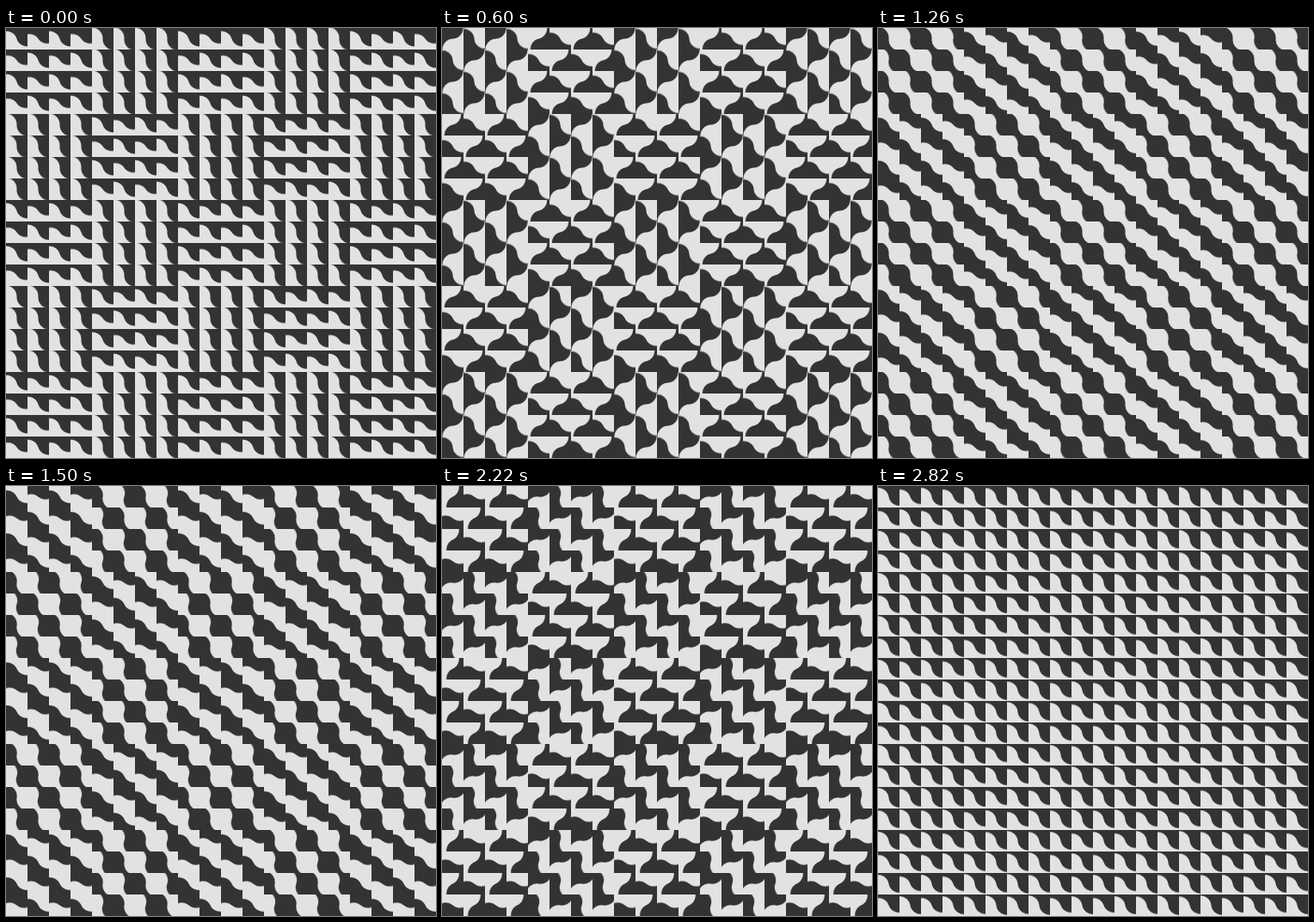
An HTML page with a canvas for the animation above (2.88 s loop, 500 px wide and 500 px high).

```html
<!DOCTYPE html>
<html lang="en">
<head>
<meta charset="utf-8">
<title>Turning tiles</title>
<style>
  html, body { margin: 0; width: 100%; height: 100%; overflow: hidden; background: #e2e2e2; }
  canvas { display: block; width: 500px; height: 500px; }
</style>
</head>
<body>
<canvas id="stage" width="500" height="500"></canvas>
<script>
const STAGE = 500, CELL = 25, GRID = STAGE / CELL, BLOCK = 4;
const STEP_MS = 60, STEPS = 48, LEAD = 2;
const SAMPLES = 15, SHUTTER = 0.6;
const LIGHT = '#e2e2e2', DARK = '#333333';

const ctx = document.getElementById('stage').getContext('2d');

// Dark half of a tile: two quarter arcs from corner to corner, extended past the cell.
const R = CELL / 2, FAR = CELL * 2;
const darkHalf = new Path2D(
  `M${-FAR} ${-FAR}L${-R} ${-R}A${R} ${R} 0 0 1 0 0A${R} ${R} 0 0 0 ${R} ${R}L${FAR} ${FAR}L${FAR} ${-FAR}Z`);

function makeTile(turns, lead) {
  const canvas = document.createElement('canvas');
  canvas.width = canvas.height = CELL;
  return { turns, lead, canvas, ctx: canvas.getContext('2d') };
}

// Indexed by [block colour][cell parity]; the sign sets the direction.
const tiles = [
  [makeTile(-1, LEAD), makeTile(-2, LEAD)],
  [makeTile(1, 0), makeTile(2, 0)]
];

// Motion blur: equal shares of several nearby angles add up to full coverage.
function paintTile({ turns, lead, ctx }, step) {
  ctx.resetTransform();
  ctx.clearRect(0, 0, CELL, CELL);
  ctx.globalCompositeOperation = 'lighter';
  ctx.globalAlpha = 1 / SAMPLES;
  ctx.fillStyle = '#000';
  for (let s = 0; s < SAMPLES; s++) {
    const at = (step + lead + SHUTTER * s / SAMPLES) / STEPS;
    ctx.setTransform(1, 0, 0, 1, R, R);
    ctx.rotate(turns * at * 2 * Math.PI);
    ctx.fill(darkHalf);
  }
  // Tint the summed coverage.
  ctx.resetTransform();
  ctx.globalCompositeOperation = 'source-in';
  ctx.globalAlpha = 1;
  ctx.fillStyle = DARK;
  ctx.fillRect(0, 0, CELL, CELL);
}

function draw(step) {
  tiles.flat().forEach(tile => paintTile(tile, step));
  ctx.fillStyle = LIGHT;
  ctx.fillRect(0, 0, STAGE, STAGE);
  for (let row = 0; row < GRID; row++) {
    for (let col = 0; col < GRID; col++) {
      const block = (Math.floor(row / BLOCK) + Math.floor(col / BLOCK)) % 2;
      ctx.drawImage(tiles[block][(row + col) % 2].canvas, col * CELL, row * CELL);
    }
  }
}

const start = performance.now();
let shown = -1;
function tick() {
  const step = Math.floor((performance.now() - start) / STEP_MS) % STEPS;
  if (step !== shown) draw(shown = step);
  requestAnimationFrame(tick);
}
tick();
</script>
</body>
</html>
```
